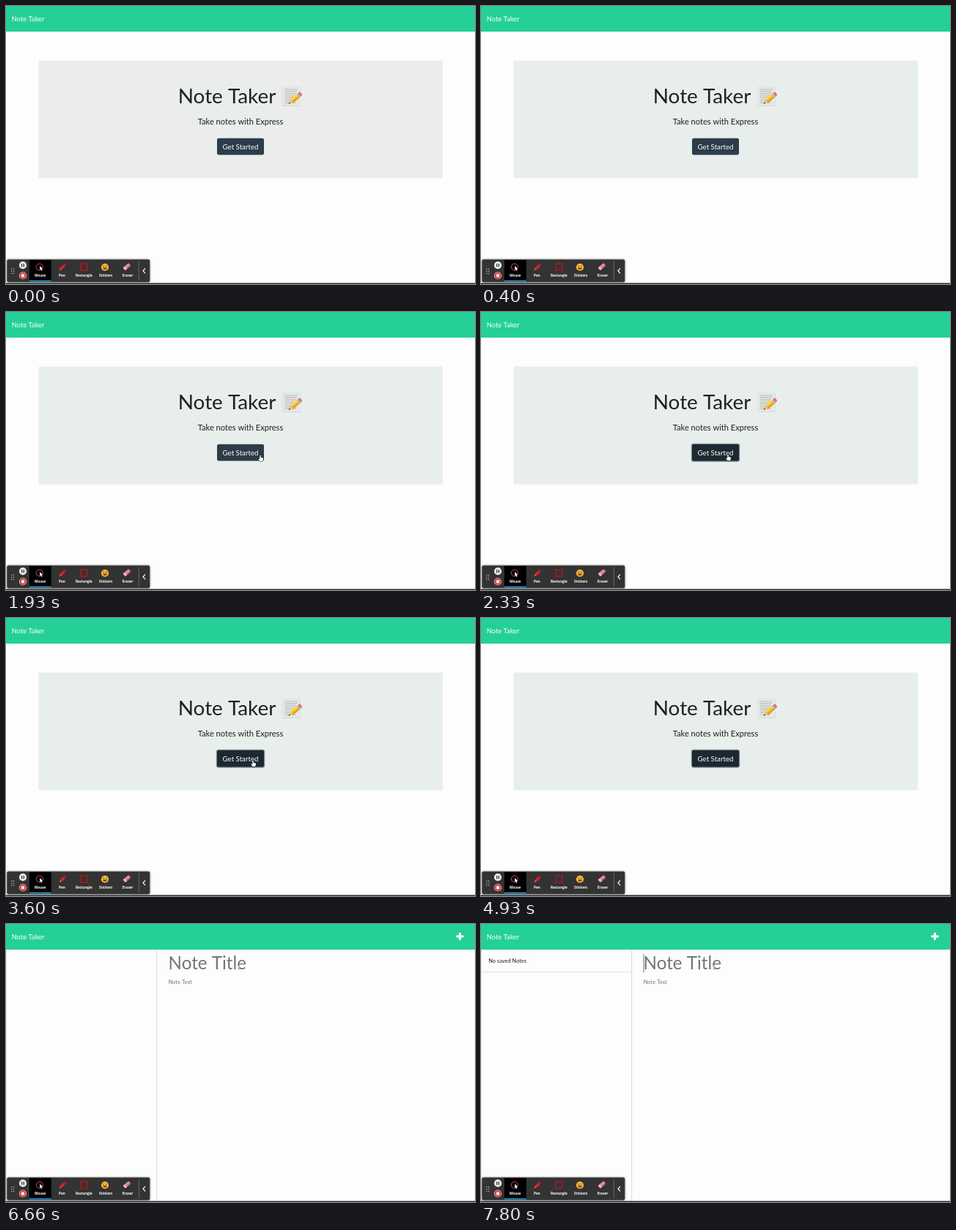
Recreate the animation shown at these times as an HTML page with a canvas. Size 640 by 380 pixels, loop 8 s.

```html
<!DOCTYPE html>
<html lang="en">
<head>
<meta charset="utf-8">
<title>Note Taker</title>
<style>
html, body { margin: 0; width: 100%; height: 100%; overflow: hidden; background: #fdfdfd; }
canvas { display: block; width: 640px; height: 380px; }
</style>
</head>
<body>
<canvas id="stage"></canvas>
<script>
const LOOP = 8000;
const canvas = document.getElementById('stage');
const ctx = canvas.getContext('2d');
const scale = window.devicePixelRatio || 1;
canvas.width = 640 * scale;
canvas.height = 380 * scale;

const clamp = (v) => Math.max(0, Math.min(1, v));
const mix = (a, b, k) => a + (b - a) * k;
const ease = (k) => k * k * (3 - 2 * k);
const progress = (t, from, to) => ease(clamp((t - from) / (to - from)));
const blend = (a, b, k) => `rgb(${a.map((v, i) => Math.round(mix(v, b[i], k)))})`;

function rect(x, y, w, h, color) {
  ctx.fillStyle = color;
  ctx.fillRect(x, y, w, h);
}

function box(x, y, w, h, r, color) {
  ctx.beginPath();
  ctx.roundRect(x, y, w, h, r);
  ctx.fillStyle = color;
  ctx.fill();
}

function disc(x, y, r, color) {
  ctx.beginPath();
  ctx.arc(x, y, r, 0, Math.PI * 2);
  ctx.fillStyle = color;
  ctx.fill();
}

function line(points, color, width) {
  ctx.beginPath();
  points.forEach(([x, y]) => ctx.lineTo(x, y));
  ctx.strokeStyle = color;
  ctx.lineWidth = width;
  ctx.stroke();
}

function text(str, x, y, size, color, align = 'left', font = 'Lato', weight = 400) {
  ctx.font = `${weight} ${size}px ${font}, sans-serif`;
  ctx.textAlign = align;
  ctx.fillStyle = color;
  ctx.fillText(str, x, y);
}

// Draws in a local frame moved to x, y and turned by angle.
function at(x, y, angle, draw) {
  ctx.save();
  ctx.translate(x, y);
  ctx.rotate(angle);
  draw();
  ctx.restore();
}

function navbar() {
  rect(0, 0, 640, 35, '#24d096');
  text('Note Taker', 7.8, 20.7, 9.32, '#fff');
}

function memo() {
  box(377.5, 110.5, 24, 26.5, 1, '#cfd3d1');
  box(378, 110.5, 23, 25.8, 1, '#e6e8e5');
  for (let i = 0; i < 8; i++) {
    line([[380.5, 114 + i * 2.6], [398 - (i * 5) % 4, 114 + i * 2.6]], '#a9adab', 0.8);
  }
  at(386.5, 133, -0.7, () => {
    ctx.beginPath();
    ctx.moveTo(-1, 0);
    ctx.lineTo(4.5, -3);
    ctx.lineTo(4.5, 3);
    ctx.fillStyle = '#e6bd8c';
    ctx.fill();
    disc(0.3, 0, 0.9, '#443c38');
    rect(4.5, -3, 11.5, 6, '#f5bd24');
    rect(4.5, -3, 11.5, 2, '#fbd94f');
    rect(4.5, 1.3, 11.5, 1.7, '#dd9520');
    rect(16, -3, 2.2, 6, '#aab3b4');
    box(18.2, -3, 3.2, 6, [0, 2, 2, 0], '#e26b72');
  });
}

function button(t) {
  const hover = progress(t, 1930, 2080);
  const ring = progress(t, 2180, 2330);
  if (ring) box(286.8, 179.7, 66.4, 25, 3.2, `rgba(112,124,130,${0.85 * ring})`);
  box(288, 180.8, 64, 22.8, 2.3, blend([44, 60, 73], [28, 41, 50], hover));
  text('Get Started', 320, 195.5, 9.7, '#fff', 'center');
}

function home(t) {
  const settled = progress(t, 60, 400);
  box(44.3, 74.5, 551.7, 161, 2, blend([235, 236, 236], [231, 238, 236], settled));
  text('Note Taker', 234.7, 133, 27.9, '#1d2222');
  memo();
  text('Take notes with Express', 320, 162, 11.1, '#1d2222', 'center');
  button(t);
}

function notes(t) {
  line([[0.3, 35], [0.3, 378]], '#d8dada', 0.8);
  line([[205.6, 35], [205.6, 378]], '#d5d7d7', 0.9);
  line([[639.7, 35], [639.7, 378]], '#dedede', 0.6);
  box(614.2, 15.4, 10.3, 3, 0.8, '#fff');
  box(617.9, 11.7, 3, 10.3, 0.8, '#fff');
  text('Note Title', 221.6, 62.3, 24.2, '#737675');
  text('Note Text', 221.8, 81.7, 7.46, '#737675');
  if (t >= 7260) {
    text('No saved Notes', 10.3, 53, 7.46, '#222');
    line([[0, 65.8], [205.5, 65.8]], '#d8dada', 0.9);
  }
  const caretOn = (t >= 6800 && t < 7260) || t >= 7800;
  if (caretOn) rect(221.6, 41.5, 0.8, 25, '#4a4d4d');
}

function arrow(x, y, size, fill, edge) {
  at(x, y, 0, () => {
    ctx.scale(size, size);
    ctx.beginPath();
    [[0, 0], [0, 5.4], [1.25, 4.3], [2.1, 6.2], [3, 5.8], [2.2, 3.9], [3.8, 3.8]]
      .forEach(([px, py]) => ctx.lineTo(px, py));
    ctx.closePath();
    ctx.lineWidth = 0.9;
    ctx.strokeStyle = edge;
    ctx.stroke();
    ctx.fillStyle = fill;
    ctx.fill();
  });
}

function hand(x, y) {
  at(x, y, 0, () => {
    ctx.beginPath();
    [[-0.7, 0], [0.6, 0], [0.7, 2.7], [3.8, 3.5], [4, 5.2], [3.1, 8], [-0.5, 8], [-2.7, 4.9], [-1.9, 4.3], [-0.7, 5.3]]
      .forEach(([px, py]) => ctx.lineTo(px, py));
    ctx.closePath();
    ctx.lineJoin = 'round';
    ctx.lineWidth = 1;
    ctx.strokeStyle = '#161d22';
    ctx.stroke();
    ctx.fillStyle = '#fff';
    ctx.fill();
    ctx.lineJoin = 'miter';
  });
}

function beam(x, y) {
  line([[x, y - 3.2], [x, y + 3.2]], '#fff', 1.6);
  line([[x, y - 3.2], [x, y + 3.2]], '#555', 0.7);
  for (const dy of [-3.3, 3.3]) line([[x - 1.4, y + dy], [x + 1.4, y + dy]], '#666', 0.6);
}

function pointer(t) {
  if (t >= 1060 && t < 4930) {
    const enter = progress(t, 1060, 1400);
    const reach = progress(t, 1480, 1860);
    const settle = progress(t, 1930, 2200);
    const x = mix(449, 362, enter) - 15 * reach - 10 * settle;
    const y = mix(222, 196, enter) - settle;
    if (x < 352) hand(x, y);
    else arrow(x, y, 0.95, '#111', '#fff');
  } else if (t >= 6130) {
    const k = progress(t, 6130, 6640);
    const x = mix(420, 318, k);
    const y = mix(120, 58.5, k);
    if (x < 330) beam(x, y);
    else arrow(x, y, 0.95, '#111', '#fff');
  }
}

function toolIcons() {
  ctx.beginPath();
  ctx.arc(45.8, 356.8, 4.5, 0, Math.PI * 2);
  ctx.strokeStyle = '#d64a50';
  ctx.lineWidth = 1;
  ctx.stroke();
  arrow(46.2, 355.3, 1.1, '#fff', '#000');

  at(73, 361, -0.78, () => {
    ctx.beginPath();
    ctx.moveTo(-0.8, 0);
    ctx.lineTo(3, -1.6);
    ctx.lineTo(3, 1.6);
    ctx.fillStyle = '#e0565c';
    ctx.fill();
    rect(3.2, -1.9, 5.6, 3.8, '#e21e2b');
    box(9.2, -1.7, 2.4, 3.4, 0.7, '#c41722');
  });

  ctx.strokeStyle = '#c90f17';
  ctx.lineWidth = 1.3;
  ctx.strokeRect(101.8, 352.4, 8.8, 8.8);

  disc(135, 357, 5.1, '#f6bb36');
  disc(133.1, 355.5, 0.8, '#54351d');
  disc(136.8, 355.5, 0.8, '#54351d');
  ctx.beginPath();
  ctx.arc(135, 357.5, 2.7, 0, Math.PI);
  ctx.fillStyle = '#7c3f20';
  ctx.fill();
  disc(138, 359.4, 1.5, '#e98b32');

  at(165, 356.3, -0.72, () => {
    box(-5, -2.4, 10, 4.8, 1.1, '#e58b9c');
    box(-5, 0.7, 10, 1.7, 0.7, '#c66a7f');
    box(-5, -2.4, 3.1, 4.8, 1, '#f1b4bf');
  });
}

function toolbar() {
  rect(0, 378.6, 640, 1.4, '#2b2d2d');
  ctx.save();
  ctx.shadowColor = 'rgba(0,0,0,0.5)';
  ctx.shadowBlur = 3 * scale;
  box(1.3, 346.5, 195, 31, 2, '#333');
  ctx.restore();

  for (let i = 0; i < 6; i++) disc(7.8 + (i % 2) * 2.8, 359.4 + (i >> 1) * 3.1, 0.75, '#c4c4c4');

  disc(23, 354.4, 5.1, '#eee');
  rect(21, 352.2, 1.3, 4.4, '#333');
  rect(23.7, 352.2, 1.3, 4.4, '#333');
  disc(23, 368.5, 5.1, '#e9d5d5');
  disc(23, 368.5, 4.5, '#d7434b');
  box(21.1, 366.6, 3.8, 3.8, 0.5, '#fff');

  rect(31.8, 347, 30, 29.5, '#000');
  rect(31.8, 375, 30, 1.6, '#2e9ad6');
  toolIcons();
  ['Mouse', 'Pen', 'Rectangle', 'Stickers', 'Eraser'].forEach((label, i) =>
    text(label, 46.6 + i * 29.85, 369.7, 4.65, '#fff', 'center', '"Open Sans"', 700));
  line([[181.3, 348.5], [181.3, 375]], '#777', 0.8);
  line([[190, 358.7], [187, 362], [190, 365.3]], '#fff', 1.2);
}

function draw(now) {
  const t = now % LOOP;
  ctx.setTransform(scale, 0, 0, scale, 0, 0);
  rect(0, 0, 640, 380, '#fdfdfd');
  navbar();
  if (t < 5660) home(t);
  else notes(t);
  toolbar();
  pointer(t);
}

const start = performance.now();
function tick() {
  draw(performance.now() - start);
  requestAnimationFrame(tick);
}
tick();
</script>
</body>
</html>
```
